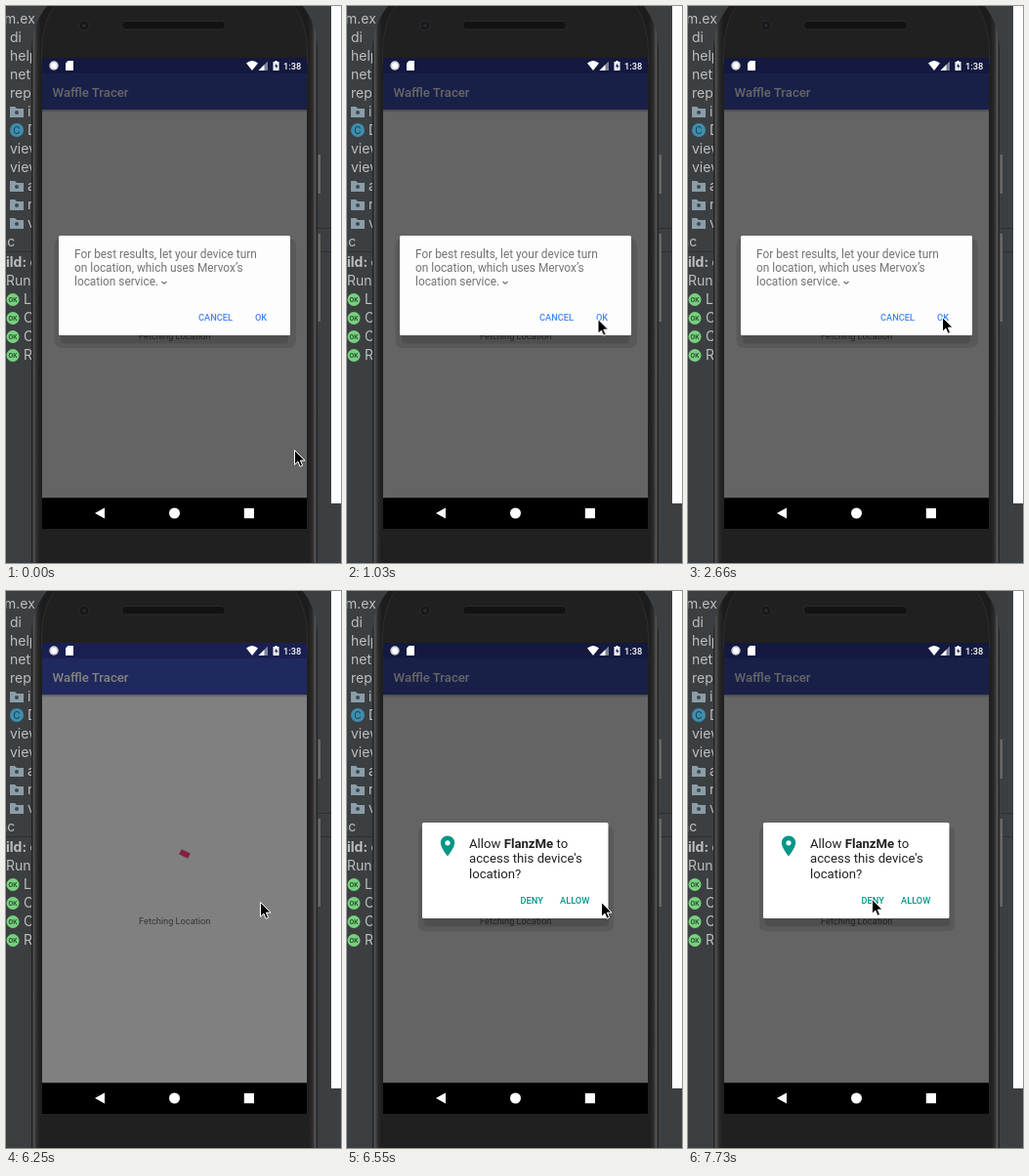
Write an HTML page that moves like this. It is 343 by 570 pixels and loops after 8 s.

```html
<!DOCTYPE html>
<html lang="en">
<head>
<meta charset="utf-8">
<title>Location permission</title>
<style>
  html, body { margin: 0; width: 100%; height: 100%; overflow: hidden; background: #3c3f41; }
  svg { display: block; width: 343px; height: 570px; }
  text { font-family: Roboto, sans-serif; white-space: pre; }
  .ide text { font: 14px Inter, sans-serif; fill: #bcbec0; }
  .ide .badge { font: 700 6px Inter, sans-serif; fill: #23502a; text-anchor: middle; }
  .small { font-size: 9.22px; }
  .button { font-size: 9.22px; font-weight: 500; }
  .title { font-size: 13.18px; font-weight: 500; fill: #fff; }
  .notice { font-size: 11.86px; fill: #737373; }
  .ask { font-size: 13.18px; fill: #212121; }
</style>
</head>
<body>
<svg viewBox="0 0 343 570" xmlns="http://www.w3.org/2000/svg">
  <defs>
    <linearGradient id="rim">
      <stop offset="0" stop-color="#161616"/>
      <stop offset=".008" stop-color="#505050"/>
      <stop offset=".02" stop-color="#2b2b2b"/>
      <stop offset=".035" stop-color="#1c1c1c"/>
      <stop offset=".965" stop-color="#1c1c1c"/>
      <stop offset=".982" stop-color="#2b2b2b"/>
      <stop offset=".992" stop-color="#555"/>
      <stop offset="1" stop-color="#161616"/>
    </linearGradient>
    <linearGradient id="barShadow" x2="0" y2="1">
      <stop offset="0" stop-opacity=".28"/>
      <stop offset="1" stop-opacity="0"/>
    </linearGradient>
    <clipPath id="screen"><rect x="37" y="53" width="271" height="450.5"/></clipPath>
  </defs>

  <!-- Editor behind the phone -->
  <rect width="343" height="570" fill="#3c3f41"/>
  <g class="ide" id="ide">
    <path d="M0 251.5H28M318 227.5H333M318 251.5H333" stroke="#2d2f31"/>
  </g>
  <rect x="333" width="10" height="509" fill="#fdfdfd"/>

  <!-- Phone -->
  <path d="M319.5 152h2.5v40h-2.5zM319.5 233h2.5v90h-2.5z" fill="#6b6764"/>
  <path d="M26 570V44Q27 16 44 -2H302Q318 16 319 44V570Z" fill="url(#rim)"/>
  <path d="M35 570V46Q36 16 51 -2H294Q309 16 310 46V570Z" fill="#202020"/>
  <path d="M36.5 60V46Q37 16 51 -2M308.500 60V46Q308 16 294 -2" fill="none" stroke="#2c2c2c"/>
  <rect x="118.500" y="15.500" width="106" height="8.500" rx="4.200" fill="#121212" stroke="#2b2b2b"/>
  <circle cx="80" cy="20" r="5" fill="#171717" stroke="#2c2c2c"/>
  <circle cx="80" cy="20" r="2" fill="#252932"/>

  <!-- App -->
  <g clip-path="url(#screen)">
    <rect x="37" y="53" width="271" height="451" fill="#fafafa"/>
    <rect x="37" y="53" width="271" height="16" fill="#303f9f"/>
    <rect x="37" y="69" width="271" height="37" fill="#3f51b5"/>
    <rect x="37" y="106" width="271" height="3" fill="url(#barShadow)"/>
    <text class="title" x="47.500" y="92.500">Waffle Tracer</text>
    <text class="small" x="136" y="341.300" fill="#666">Fetching Location</text>
    <rect id="spinner" x="-5" y="-3" width="10" height="6" fill="#ff4081"/>
    <rect id="scrim" x="37" y="53" width="271" height="451"/>
  </g>

  <g id="notice">
    <rect x="49.500" y="238" width="247.500" height="112" rx="7" fill-opacity=".1"/>
    <rect x="56" y="240" width="233" height="105.500" rx="4" fill-opacity=".13"/>
    <rect x="54" y="235" width="237" height="102" rx="1.500" fill="#fdfdfd"/>
    <g class="notice">
      <text x="70" y="258.200">For best results, let your device turn</text>
      <text x="70" y="272.100">on location, which uses Mervox’s</text>
      <text x="70" y="286">location service.</text>
    </g>
    <path d="M159.500 282l2.500 2.300 2.500 -2.300" fill="none" stroke="#737373" stroke-width="1.200"/>
    <g class="button" fill="#4285f4">
      <text x="197" y="322">CANCEL</text>
      <text x="255" y="322">OK</text>
    </g>
  </g>

  <g id="ask">
    <rect x="73" y="241" width="200" height="107" rx="6" fill-opacity=".1"/>
    <rect x="78.500" y="242" width="190" height="101" rx="4" fill-opacity=".13"/>
    <rect x="77" y="237" width="190.500" height="98" rx="1.500" fill="#fff"/>
    <path fill="#009688" fill-rule="evenodd" d="M103 250.500a7.200 7.200 0 0 0 -7.200 7.200c0 5.300 7.200 13.500 7.200 13.500s7.200 -8.200 7.200 -13.500a7.200 7.200 0 0 0 -7.200 -7.200zm0 4.700a2.600 2.600 0 1 1 0 5.200a2.600 2.600 0 1 1 0 -5.200z"/>
    <g class="ask">
      <text x="125" y="263">Allow <tspan font-weight="700">FlanzMe</tspan> to</text>
      <text x="125" y="278.400">access this device's</text>
      <text x="125" y="293.900">location?</text>
    </g>
    <g class="button" fill="#009688">
      <text x="177.500" y="320">DENY</text>
      <text x="218" y="320">ALLOW</text>
    </g>
  </g>

  <!-- System bars -->
  <g fill="#fff">
    <circle cx="49" cy="61" r="4.700" fill-opacity=".8"/>
    <circle cx="49" cy="61" r="2.900"/>
    <path d="M63.500 56H69V66H61V58.500Z"/>
    <path d="M246 58.500Q252 53.500 258 58.500L252 66Z"/>
    <path d="M268 56.500V66H258.500Z" fill-opacity=".45"/>
    <path d="M264.500 60V66H258.500Z"/>
    <path d="M275.500 56h2v1h2v9h-6v-9h2z"/>
    <path d="M277 58.500l-2 3.500h1.500v2.500l2 -3.500h-1.500z" fill="#1a2050"/>
    <text class="button" x="284" y="64.600">1:38</text>
  </g>
  <rect x="37" y="503.500" width="271" height="31.500"/>
  <g fill="#fff">
    <path d="M91 519L101 513.500V524.500Z"/>
    <circle cx="172.500" cy="519" r="5.500"/>
    <rect x="243.800" y="514" width="10.200" height="10.200" rx=".5"/>
  </g>

  <path id="cursor" d="M.5 .5V15.300L3.900 12.100L6.100 17.300L8.600 16.200L6.400 11.100H11Z" stroke="#fff" stroke-linejoin="round"/>
</svg>

<script>
const LOOP = 8000;
const $ = id => document.getElementById(id);

// Editor tree: [label, x, baseline, icon]
const rows = [
  ['m.ex', -2, 18], ['di', 4, 37], ['help', 4, 56], ['netw', 4, 75], ['repo', 4, 94],
  ['in', 22, 113, 'folder'], ['D', 22, 132, 'class'], ['view', 4, 151], ['view', 4, 170],
  ['a', 22, 189, 'folder'], ['r', 22, 208, 'folder'], ['v', 22, 227, 'folder'],
  ['nc', -7, 246], ['ild: c', 0, 267, 'bold'], ['Run', 0, 286],
  ['L', 18, 305, 'ok'], ['C', 18, 324, 'ok'], ['C', 18, 343, 'ok'], ['R', 18, 362, 'ok']
];
const icons = {
  folder: y => `<path d="M4 ${y - 10}h5l2 2h7v9h-14z" fill="#8b9da8"/><circle cx="11" cy="${y - 4}" r="2" fill="#3c4a52"/>`,
  class: y => `<circle cx="11" cy="${y - 5}" r="7" fill="#3d8eae"/>
    <text x="11" y="${y - 1.5}" style="font-size:10px;fill:#203c48;text-anchor:middle">C</text>`,
  ok: y => `<circle cx="7" cy="${y - 4.500}" r="6.500" fill="#78d07f"/><text class="badge" x="7" y="${y - 2.300}">OK</text>`
};
$('ide').innerHTML += rows.map(([label, x, y, kind]) =>
  (icons[kind]?.(y) ?? '') +
  `<text x="${x}" y="${y}"${kind === 'bold' ? ' style="font-weight:700"' : ''}>${label}</text>`
).join('');

// Plays [time, value] pairs as hard steps.
function play(id, property, steps) {
  const frames = steps.map(([time, value]) =>
    ({ offset: time / LOOP, [property]: value, easing: 'steps(1, end)' }));
  frames.push({ offset: 1, [property]: steps.at(-1)[1] });
  $(id).animate(frames, { duration: LOOP, iterations: Infinity });
}

const cursorPath = [
  [0, 295, 454], [300, 263, 374], [450, 252, 331], [590, 250, 326], [740, 253, 320],
  [880, 252, 320], [1030, 256.5, 320], [1180, 255, 320], [1330, 248, 321], [1480, 244, 321],
  [1780, 242, 321], [1930, 235, 321], [2070, 225, 321], [2220, 226, 321], [2360, 246, 321],
  [2510, 254, 321], [2660, 260, 318], [7300, 236, 318], [7440, 201, 318],
  [7590, 189, 315], [7730, 188, 315]
];
play('cursor', 'transform', cursorPath.map(([t, x, y]) => [t, `translate(${x}px, ${y}px)`]));
play('scrim', 'opacity', [[0, .6], [6250, .49], [6400, .11], [6550, .6]]);
play('notice', 'opacity', [[0, 1], [6250, 0]]);
play('ask', 'opacity', [[0, 0], [6400, .4], [6550, 1]]);
play('spinner', 'transform', [
  [0, 'translate(183px, 269px) rotate(25deg)'],
  [6400, 'translate(195px, 282px) rotate(-25deg) scale(.55, .9)']
]);
</script>
</body>
</html>
```
